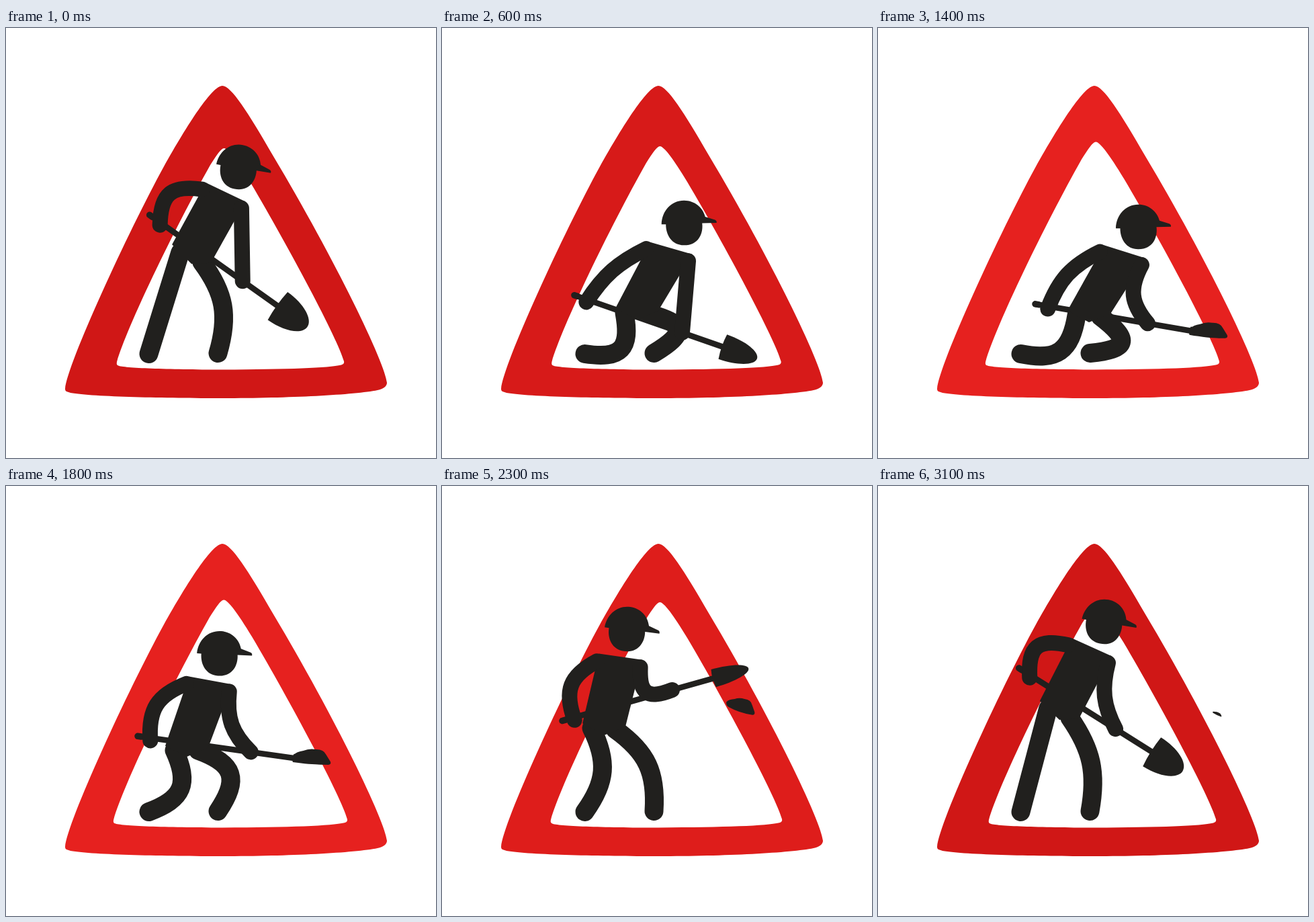
Write an HTML page with a canvas that moves like this. It is 640 by 640 pixels and loops after 3.2 s.

```html
<!DOCTYPE html>
<html lang="en">
<head>
<meta charset="utf-8">
<title>Road works</title>
<style>
html, body { margin: 0; width: 100%; height: 100%; overflow: hidden; background: #fff; }
canvas { display: block; width: 100%; height: 100%; }
</style>
</head>
<body>
<canvas id="stage" width="640" height="640"></canvas>
<script>
const ctx = document.getElementById('stage').getContext('2d');
const LOOP = 3200, STEP = 100;
const SCOOP = 1000, LOADED = 1400, LIFT = 1800, THROW = 2300;
const INK = '#21201e';
const BACK_FOOT = [212.5, 485], FRONT_FOOT = [315.5, 484];

// Key poses: pelvis, lean of the spine, grip of the shovel, angle of the shovel.
const poses = [
  { t: 0, x: 276, y: 336, lean: 29.8, gx: 212, gy: 277, angle: 35.4 },
  { t: 600, x: 290, y: 419, lean: 30, gx: 195, gy: 397, angle: 19.2 },
  { t: SCOOP, x: 304, y: 431, lean: 31, gx: 208, gy: 411, angle: 13.5 },
  { t: LOADED, x: 314, y: 423, lean: 31.5, gx: 232, gy: 410.5, angle: 9.8 },
  { t: LIFT, x: 269, y: 388, lean: 20.5, gx: 194, gy: 372, angle: 8 },
  { t: THROW, x: 241, y: 356, lean: 14.5, gx: 177, gy: 350, angle: -15.7 },
  { t: 2800, x: 253, y: 346, lean: 16.4, gx: 189, gy: 330, angle: 0.8 },
  { t: 3100, x: 270, y: 333, lean: 28.2, gx: 208, gy: 270, angle: 32.2 }
];

const clamp = v => Math.max(0, Math.min(1, v));
const rad = degrees => degrees * Math.PI / 180;
const add = (p, x, y) => [p[0] + x, p[1] + y];
const polar = (p, r, degrees) => add(p, r * Math.cos(rad(degrees)), r * Math.sin(rad(degrees)));
const lerp = (p, q, u) => [p[0] + (q[0] - p[0]) * u, p[1] + (q[1] - p[1]) * u];

// Smooth periodic interpolation through the key poses.
function poseAt(t) {
  const n = poses.length;
  const key = i => {
    const p = poses[(i + n) % n];
    return { ...p, t: p.t + LOOP * Math.floor(i / n) };
  };
  let i = n - 1;
  while (poses[i].t > t) i--;
  const a = key(i - 1), b = key(i), c = key(i + 1), d = key(i + 2);
  const span = c.t - b.t, u = (t - b.t) / span, u2 = u * u, u3 = u2 * u;
  const pose = {};
  for (const k of Object.keys(b)) {
    const m0 = (c[k] - a[k]) / (c.t - a.t) * span;
    const m1 = (d[k] - b[k]) / (d.t - b.t) * span;
    pose[k] = (2 * u3 - 3 * u2 + 1) * b[k] + (u3 - 2 * u2 + u) * m0 +
              (3 * u2 - 2 * u3) * c[k] + (u3 - u2) * m1;
  }
  return pose;
}

// All joints follow from the pelvis, the lean and the shovel.
function skeleton({ x, y, lean, gx, gy, angle }) {
  const crouch = clamp((y - 335) / 85);
  const tilt = lean - 4 - 10 * crouch, hipTilt = tilt - 13 * crouch;
  const pelvis = [x, y], grip = [gx, gy];
  const chest = polar(pelvis, 105, lean - 90);
  const leftTop = polar(chest, -34, tilt), rightTop = polar(chest, 31, tilt);
  const leftHip = polar(pelvis, -32, hipTilt), rightHip = polar(pelvis, 32, hipTilt);
  return {
    head: polar(chest, 39, lean - 93), headTilt: 11 * (1 - crouch),
    torso: [leftTop, rightTop, rightHip, add(pelvis, 0, 15), leftHip],
    backShoulder: polar(leftTop, 11.5, lean + 90),
    frontShoulder: polar(rightTop, 11.5, lean + 90),
    backHip: add(polar(leftHip, 13.5, hipTilt), 0, 6),
    frontHip: add(polar(rightHip, -15, hipTilt), 0, 5),
    backHand: add(polar(grip, 21, angle), 0, 4),
    frontHand: polar(grip, 172, angle)
  };
}

const fillPath = d => ctx.fill(new Path2D(d));

// Two equal bones between the ends, drawn as one soft curve; side picks the bend.
function limb(from, to, bone, side, width) {
  const dx = to[0] - from[0], dy = to[1] - from[1], reach = Math.hypot(dx, dy);
  const bend = side * Math.sqrt(Math.max(0, bone * bone - reach * reach / 4)) / reach;
  const joint = add(lerp(from, to, 0.5), dy * bend, -dx * bend);
  ctx.lineWidth = width;
  ctx.beginPath();
  ctx.moveTo(...from);
  ctx.bezierCurveTo(...lerp(from, joint, 0.75), ...lerp(to, joint, 0.75), ...to);
  ctx.stroke();
}

function placed(p, degrees, draw) {
  ctx.save();
  ctx.translate(...p);
  ctx.rotate(rad(degrees));
  draw();
  ctx.restore();
}

function drawSign(pulse) {
  const mix = (a, b) => Math.round(a + (b - a) * pulse);
  ctx.fillStyle = `rgb(${mix(208, 231)},${mix(23, 33)},${mix(22, 31)})`;
  fillPath('M322 86C307 86 271 142 234.5 207C182 303 91 500 88 537C88 541 90 541 96 543' +
    'C130 549 240 551 322 551C420 551 520 546 553 539C562 537 567 533 567 528' +
    'C565 500 490 345 398 191C360 125 335 86 322 86Z');
  const grow = 1 + 0.03 * pulse;
  ctx.save();
  ctx.translate(334.5, 508.5);
  ctx.scale(grow, grow);
  ctx.translate(-334.5, -508.5);
  ctx.fillStyle = '#fff';
  fillPath('M165 497C180 445 250 300 304 204C313 190 320 179 324.5 179' +
    'C330 179 344 197 365 232C420 325 495 465 503 496Q504 500 499 501.5' +
    'C480 506 420 508 322 508.5C240 508.5 175 506 167 502.5Q164 501.5 165 497Z');
  ctx.restore();
}

function drawShovel({ gx, gy, angle }, w) {
  placed([gx, gy], angle, () => {
    ctx.fillRect(0, -4.3, 240, 8.6);
    ctx.lineWidth = 9.5;
    ctx.beginPath();
    ctx.moveTo(2, 0);
    ctx.lineTo(7, 0);
    ctx.stroke();
    fillPath(`M236 ${-w}C266 ${-w} 290 ${-w * 0.55} 290 0C290 ${w * 0.55} 266 ${w} 236 ${w}Q233 0 236 ${-w}Z`);
  });
}

// The load grows on the blade, slips off during the lift, then flies and shrinks.
function drawDirt(t) {
  if (t <= SCOOP) return;
  const onBlade = Math.min(t, THROW), { gx, gy, angle } = poseAt(onBlade);
  const slip = clamp((t - LIFT) / (THROW - LIFT)), flight = t - onBlade;
  const age = clamp((t - LIFT) / (LOOP - LIFT));
  const size = clamp((t - SCOOP) / (LOADED - SCOOP));
  const start = polar(polar([gx, gy], 264, angle), 56 * slip * slip - 5, angle + 90);
  const at = add(start, 0.075 * flight, 0.000284 * flight * flight - 0.213 * flight);
  const spin = 3 + 8 * slip + 28 * Math.sin(Math.PI * flight / 900);
  placed(at, spin, () => {
    ctx.scale(size * Math.sqrt(1 - age), size * (1 - age ** 3));
    fillPath('M-28 -2Q-24 -7 -14 -9Q-6 -13 4 -12Q16 -13 20 -5L27 5Q29 9 24 10Q0 11 -22 5Q-28 3 -28 -2Z');
  });
}

function drawWorker(s) {
  limb(s.backHip, BACK_FOOT, 73, 1, 28);
  limb(s.frontHip, FRONT_FOOT, 77, 1, 28);
  ctx.beginPath();
  s.torso.forEach(p => ctx.lineTo(...p));
  ctx.fill();
  limb(s.backShoulder, s.backHand, 62, -1, 23);
  limb(s.frontShoulder, s.frontHand, 53, -1, 23);
  placed(s.head, s.headTilt, () => fillPath(
    'M-33.5 -1C-33 -21 -19 -36.5 0 -36.5C16 -36.5 28 -26 31.5 -12.5L46 -8Q49 -7 48.5 -3.5L27 -3' +
    'C29 12 22 30 0 30C-18 30 -27 15 -27 -1Z'));
}

function render(t) {
  const pulse = (1 - Math.cos(2 * Math.PI * t / LOOP)) / 2;
  const pose = poseAt(t);
  ctx.fillStyle = '#fff';
  ctx.fillRect(0, 0, 640, 640);
  drawSign(pulse);
  ctx.fillStyle = ctx.strokeStyle = INK;
  ctx.lineCap = ctx.lineJoin = 'round';
  drawShovel(pose, 25.5 - 20 * pulse);
  drawDirt(t);
  drawWorker(skeleton(pose));
}

const start = performance.now();
function tick() {
  const t = Math.max(0, performance.now() - start);
  render(Math.floor(t / STEP) * STEP % LOOP);
  requestAnimationFrame(tick);
}
tick();
</script>
</body>
</html>
```
